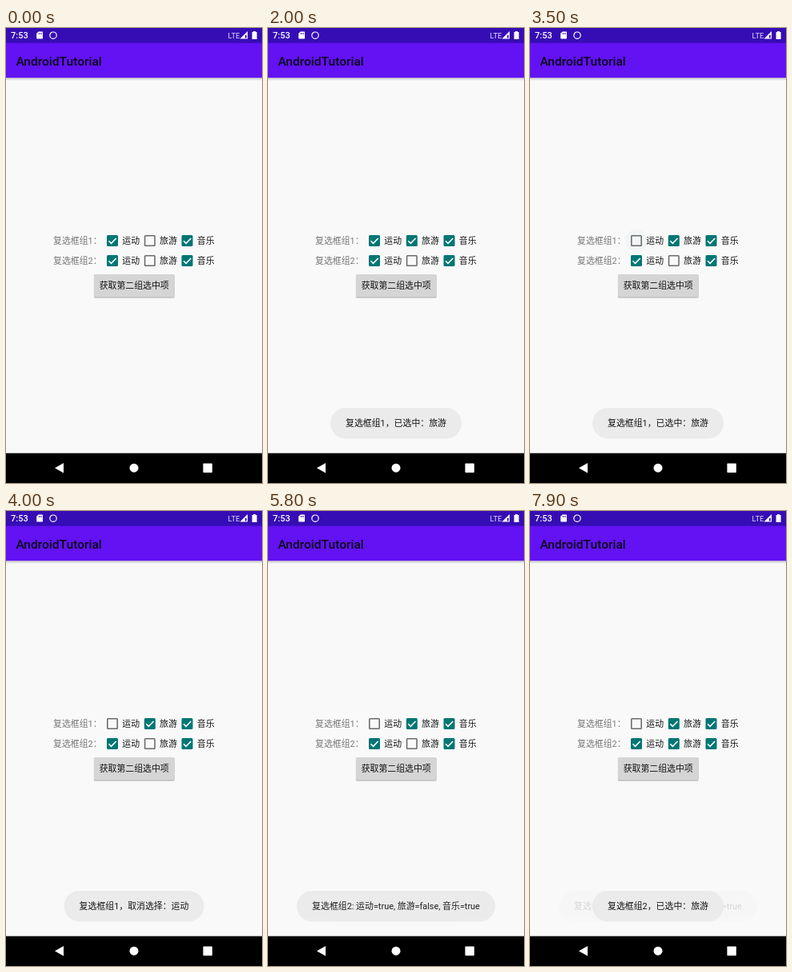
Recreate the animation shown at these times as an HTML page. Size 320x569 px, loop 8 s.

```html
<!DOCTYPE html>
<html lang="zh-CN">
<head>
<meta charset="utf-8">
<title>Checkbox demo</title>
<style>
html, body { margin: 0; width: 100%; height: 100%; overflow: hidden; background: #f9f9f9; }
svg { display: block; width: 100%; height: 100%; }
text { font: 10.9px Roboto, "Noto Sans CJK SC", "Noto Sans CJK JP", "Noto Sans CJK", sans-serif; fill: #141414; }
.white, .white text { fill: #fff; }
.label { fill: #787878; }
.mid { text-anchor: middle; }
</style>
</head>
<body>
<svg viewBox="0 0 320 569">
  <defs>
    <linearGradient id="shade" x2="0" y2="1">
      <stop stop-opacity=".22"/><stop offset="1" stop-opacity="0"/>
    </linearGradient>
    <clipPath id="face"><rect x="110" y="308" width="100.5" height="28.5" rx="1.5"/></clipPath>
  </defs>
  <rect width="320" height="569" fill="#f9f9f9"/>
  <rect y="62" width="320" height="4" fill="url(#shade)"/>
  <rect width="320" height="62.2" fill="#6212f3"/>
  <rect width="320" height="18.7" fill="#360db5"/>
  <text x="12.4" y="46.6" style="font-size:15.56px;font-weight:500;fill:#0b0418">AndroidTutorial</text>

  <g class="white">
    <text x="6" y="13.4" style="font-size:11px;font-weight:500">7:53</text>
    <path d="M40.6 4.4H45.2Q46 4.4 46 5.2V12.8Q46 13.6 45.2 13.6H39Q38.2 13.6 38.2 12.8V6.8Z"/>
    <path d="M41 6V8M42.7 6V8M44.4 6V8" stroke="#360db5" stroke-width=".8"/>
    <circle cx="59" cy="9.2" r="4.2" fill="none" stroke="#fff" stroke-width="1.2"/>
    <text x="277.6" y="12.8" style="font-size:9.4px;fill:#e2dcf6">LTE</text>
    <path d="M292.4 13.6L302 4V13.6Z"/>
    <path d="M299 9V12.6H300.8V9Z" fill="#360db5"/>
    <path d="M309 4H312V5H313.6V14H307.6V5H309Z"/>
  </g>

  <g id="form"></g>

  <rect x="110" y="308.4" width="100.5" height="29" rx="1.5" opacity=".22"/>
  <rect x="109.6" y="308" width="101.3" height="30" rx="2" opacity=".07"/>
  <rect x="110" y="308" width="100.5" height="28.5" rx="1.5" fill="#d5d5d5"/>
  <g clip-path="url(#face)"><circle id="press" cx="163" cy="322"/></g>
  <text class="mid" x="160.2" y="325.9">获取第二组选中项</text>

  <g id="toasts"></g>

  <rect y="531.7" width="320" height="38"/>
  <g class="white">
    <path d="M61 550.2L72 543.9V556.5Z"/>
    <circle cx="160" cy="550.2" r="5.5"/>
    <rect x="246.4" y="544.6" width="11.4" height="11.4" rx=".7"/>
  </g>
</svg>
<script>
const LOOP = 8000, STEP = 100, FADE = 400, PRESS = 5400;
const TEAL = '#007674', GREY = '#6b6b6b', HOLE = 5.45;
const BOX = 'M-5.5-7H5.5Q7-7 7-5.5V5.5Q7 7 5.5 7H-5.5Q-7 7-7 5.5V-5.5Q-7-7-5.5-7Z';
const TOASTS = [
  [1550, '复选框组1，已选中：旅游', 164],
  [3550, '复选框组1，取消选择：运动', 175],
  [5500, '复选框组2: 运动=true, 旅游=false, 音乐=true', 248],
  [7530, '复选框组2，已选中：旅游', 164]
];
// click time for each box that toggles, keyed by row and column
const CLICKS = { '00': 3200, '01': 1400, '11': 7400 };
const COLUMNS = [['运动', 133], ['旅游', 179.8], ['音乐', 226.5]];

const $ = id => document.getElementById(id);
const clamp = v => Math.min(1, Math.max(0, v));

function add(parent, name, attrs, text) {
  const el = document.createElementNS('http://www.w3.org/2000/svg', name);
  for (const k in attrs) el.setAttribute(k, attrs[k]);
  if (text) el.textContent = text;
  return parent.appendChild(el);
}
function set(el, attrs) {
  for (const k in attrs) el.setAttribute(k, attrs[k]);
}

const boxes = [];
[266, 291].forEach((y, row) => {
  add($('form'), 'text', { x: 59, y: y + 4, class: 'label' }, `复选框组${row + 1}：`);
  COLUMNS.forEach(([name, x], col) => {
    add($('form'), 'text', { x: x + 12.3, y: y + 4 }, name);
    const g = add($('form'), 'g', { transform: `translate(${x} ${y})` });
    boxes.push({
      initial: col != 1,
      click: CLICKS[`${row}${col}`] ?? Infinity,
      ripple: add(g, 'circle', { r: 14 }),
      frame: add(g, 'path', { 'fill-rule': 'evenodd' }),
      tick: add(g, 'path', { d: 'M-4.5.3L-1.5 3.3L4.7-3', fill: 'none', stroke: '#fff', 'stroke-width': 1.6 })
    });
  });
});

const toasts = TOASTS.map(([start, text, w], i) => {
  const g = add($('toasts'), 'g', {});
  add(g, 'rect', { x: 160 - w / 2, y: 475, width: w, height: 38.4, rx: 19.2, fill: '#ebebeb' });
  add(g, 'text', { x: 160, y: 498.2, class: 'mid' }, text);
  return { g, start, end: TOASTS[i + 1]?.[0] ?? Infinity };
});

function drawBox(b, t) {
  const d = t - b.click, clicked = d >= 0;
  const on = b.initial != clicked;
  let hole = on ? 0 : 1, tick = on ? 1 : 0;
  if (clicked && on) {
    hole = clamp(1 - (d + 70) / 180);
    tick = clamp((d - 50) / 200);
  } else if (clicked) {
    tick = clamp(1 - (d + 40) / 140);
    hole = clamp((d - 50) / 200);
  }
  const h = hole * HOLE;
  set(b.frame, { d: `${BOX}M${-h} ${-h}H${h}V${h}H${-h}Z`, fill: on ? TEAL : GREY });
  set(b.tick, { transform: `scale(${tick})`, opacity: tick ? 1 : 0 });
  set(b.ripple, {
    fill: b.initial ? TEAL : '#000',
    opacity: clicked ? 0.16 * clamp(1 - (d - 50) / 300) : 0
  });
}

function draw(now) {
  const t = Math.floor(now % LOOP / STEP) * STEP;
  boxes.forEach(b => drawBox(b, t));
  const d = t - PRESS;
  set($('press'), {
    r: 37 + 20 * clamp(d / 150),
    opacity: d < 0 ? 0 : 0.13 * clamp(1 - (d - 50) / 300)
  });
  for (const { g, start, end } of toasts) {
    const enter = clamp((t - start) / FADE), leave = clamp((t - end) / FADE);
    set(g, { opacity: (1 - (1 - enter) ** 2) * (1 - leave ** 2) });
  }
  requestAnimationFrame(draw);
}
draw(performance.now());
</script>
</body>
</html>
```
